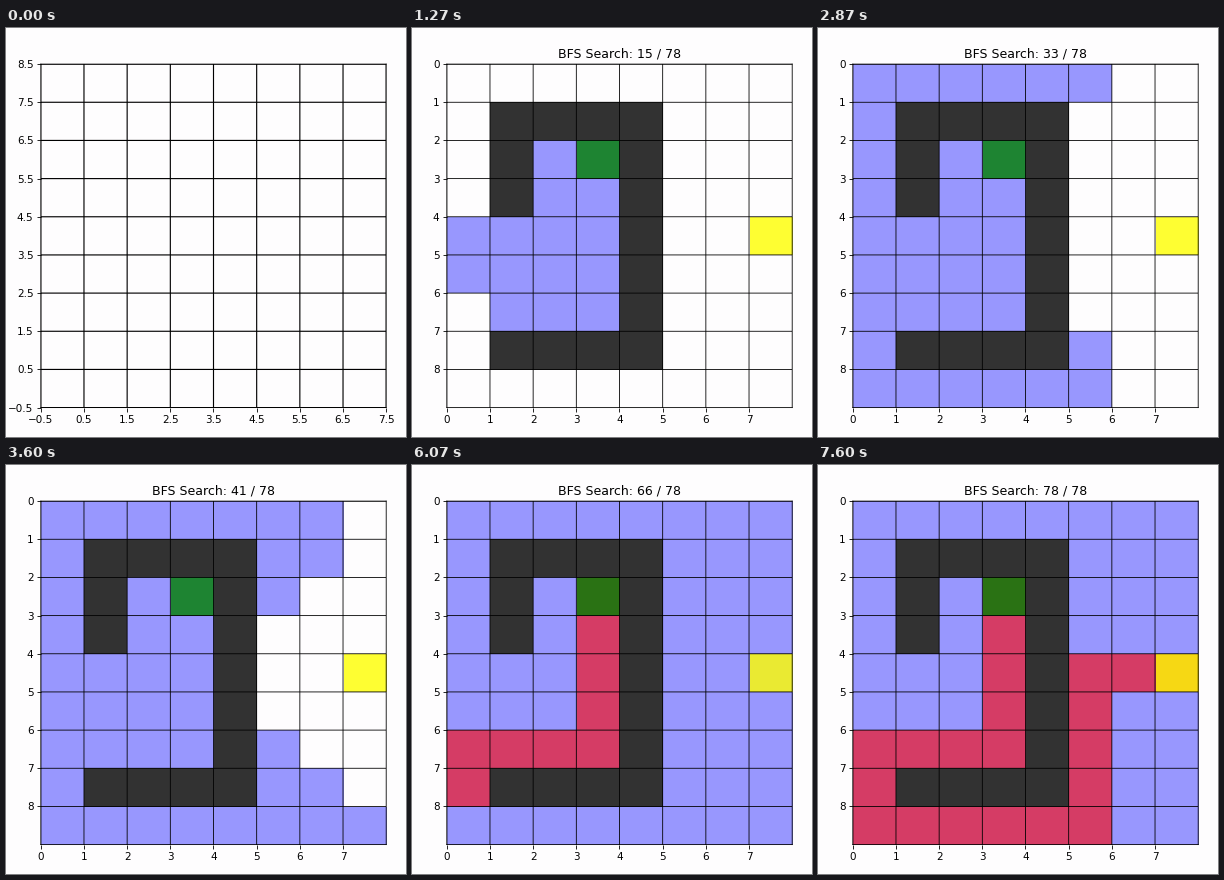
Animation of 400x409 px, one loop 7670 ms. Source, as a matplotlib script:

```python
import matplotlib.pyplot as plt
import numpy as np
from matplotlib.animation import FuncAnimation

W, H, DPI = 400, 409, 75
LEFT, RIGHT, TOP, BOTTOM = 34.8, 380.2, 36.1, 379.6
ROWS, COLS = 9, 8
FRAMES, INTERVAL = 118, 65
START, GOAL = (2, 3), (4, 7)
WALLS = (
    {(1, c) for c in range(1, 5)}
    | {(7, c) for c in range(1, 5)}
    | {(r, 4) for r in range(2, 7)}
    | {(2, 1), (3, 1)}
)
MOVES = [(1, 0), (0, -1), (-1, 0), (0, 1)]

PAPER = np.array([254, 253, 254]) / 255
BLUE, RED, BLACK = (0, 0, 1), (1, 0, 0), (0, 0, 0)
GREEN, YELLOW = (0, 0.5, 0), (1, 1, 0)


def bfs():
    """Return the visiting order and the path from start to goal."""
    parent = {START: None}
    order = [START]
    for r, c in order:
        for dr, dc in MOVES:
            cell = (r + dr, c + dc)
            inside = 0 <= cell[0] < ROWS and 0 <= cell[1] < COLS
            if inside and cell not in WALLS and cell not in parent:
                parent[cell] = (r, c)
                order.append(cell)
    path = [GOAL]
    while parent[path[-1]]:
        path.append(parent[path[-1]])
    return order, path[::-1]


ORDER, PATH = bfs()
TOTAL = len(ORDER) + len(PATH)


def empty_board():
    return np.tile(PAPER, (ROWS, COLS, 1))


def blend(img, cells, color, alpha):
    for cell in cells:
        img[cell] = alpha * np.array(color) + (1 - alpha) * img[cell]


def board(step):
    img = empty_board()
    blend(img, ORDER[:step], BLUE, 0.4)
    blend(img, PATH[:max(0, step - len(ORDER))], RED, 0.6)
    blend(img, WALLS, BLACK, 0.8)
    blend(img, [START], GREEN, 0.8)
    blend(img, [GOAL], YELLOW, 0.8)
    return img


def step_at(i):
    """Search step, slowing down a little as the run goes on."""
    t = (i * INTERVAL + 40) / 1000
    return min(TOTAL, max(1, int(0.03 + 12.15 * t - 0.209 * t * t)))


def half(v):
    return f"{v - 0.5:.1f}".replace("-", "\u2212")


# Keep lines at their exact sub-pixel positions
plt.rcParams.update({"font.family": "DejaVu Sans", "path.snap": False})
fig = plt.figure(figsize=(W / DPI, H / DPI), dpi=DPI, facecolor=PAPER)
ax = fig.add_axes([LEFT / W, 1 - BOTTOM / H, (RIGHT - LEFT) / W, (BOTTOM - TOP) / H])
image = ax.imshow(empty_board(), extent=(0, COLS, ROWS, 0),
                  aspect="auto", interpolation="nearest")
title = ax.set_title("", fontsize=12, pad=6.6)
ax.tick_params(labelsize=10)


def update(i):
    if i == 0:
        image.set_data(empty_board())
        title.set_text("")
        ax.set_xticks(range(COLS + 1), [half(c) for c in range(COLS + 1)])
        ax.set_yticks(range(ROWS + 1), [half(ROWS - r) for r in range(ROWS + 1)])
        ax.grid(True, color="black", linewidth=1.1)
    else:
        step = step_at(i)
        image.set_data(board(step))
        title.set_text(f"BFS Search: {step} / {TOTAL}")
        ax.set_xticks(range(COLS), range(COLS))
        ax.set_yticks(range(ROWS), range(ROWS))
        ax.grid(True, color="black", linewidth=0.8)
    return image, title


anim = FuncAnimation(fig, update, frames=FRAMES, interval=INTERVAL,
                     init_func=lambda: update(0), repeat=True, repeat_delay=0)
plt.show()
```
